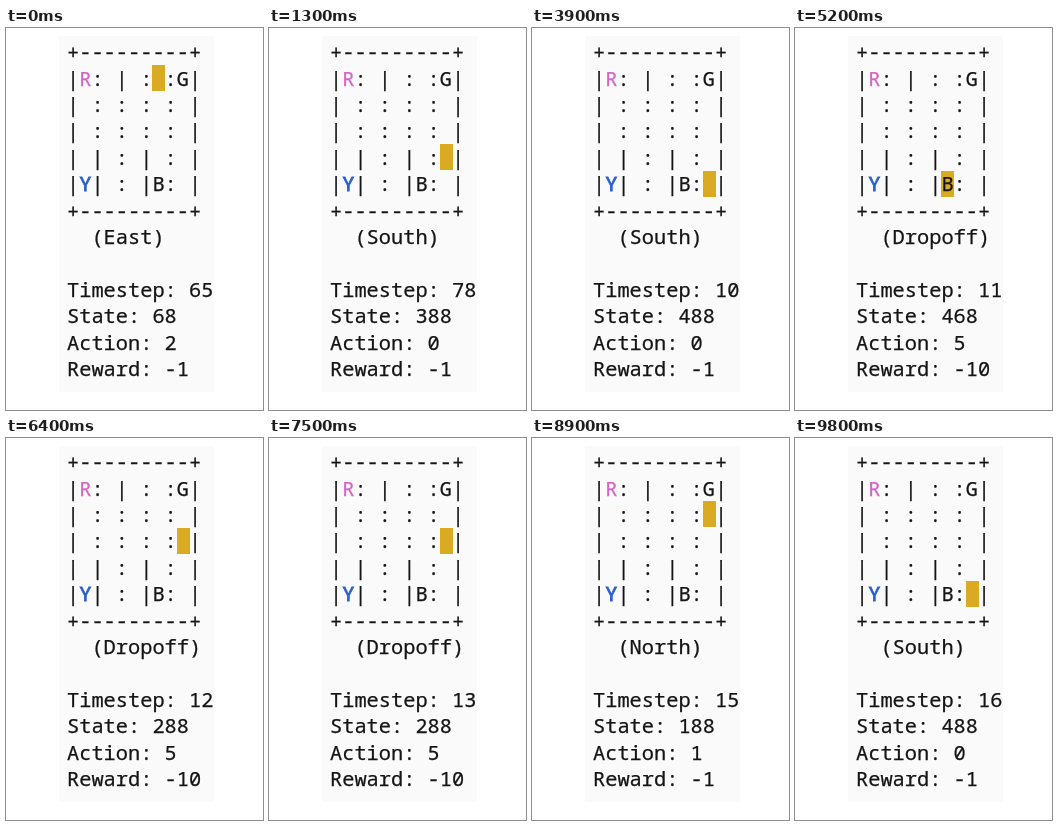
Recreate the animation shown at these times as an HTML page. Size 257x382 px, loop 9.9 s.

```html
<!DOCTYPE html>
<html lang="en">
<head>
<meta charset="utf-8">
<title>Taxi grid</title>
<style>
  html, body { margin: 0; width: 100%; height: 100%; overflow: hidden; background: #fff; }
  #panel { position: absolute; left: 53px; top: 8px; width: 155px; height: 356px;
    overflow: hidden; background: #fafafa; }
  #text { position: absolute; left: 8px; top: 2.2px; margin: 0; color: #151515;
    font: 20.33px/26.4px "Noto Sans Mono", "DejaVu Sans Mono", monospace;
    -webkit-text-stroke: 0.25px; }
  #taxi { position: absolute; width: 13px; height: 26px; background: #d9aa22; }
  .passenger { color: #2b62c9; -webkit-text-stroke: 0.9px; }
  .goal { color: #d467c6; }
</style>
</head>
<body>
<div id="panel"><div id="taxi"></div><pre id="text"></pre></div>
<script>
const MAP = [
  '+---------+',
  '|R: | : :G|',
  '| : : : : |',
  '| : : : : |',
  '| | : | : |',
  '|Y| : |B: |',
  '+---------+'
];
const ACTIONS = {
  S: ['South', 0], N: ['North', 1], E: ['East', 2],
  W: ['West', 3], P: ['Pickup', 4], D: ['Dropoff', 5]
};
const FIRST_STEP = 65, TICK = 100, LOOP = 9900;
const HOLDS = [25, 27];   // ticks on which the simulation pauses
const ROUTE =
  'EDEPNSNEDSN' + 'SSSEPSDNSE' + 'DSPEDE' + 'PSNNDSESP' + 'DSS' +
  'PEWDWPSDD' + 'SWDPWW' + 'NNDENPESDS' + 'PENDSENPED' +
  'PENDESPNDE' + 'NSSNDPSEDS' + 'NSS';

const CHAR = 12.2, LINE = 26.4;
const text = document.getElementById('text');
const taxi = document.getElementById('taxi');

function move({ row, col }, action) {
  const open = side => MAP[row + 1][2 * col + 1 + side] === ':';
  if (action === 'S') row = Math.min(4, row + 1);
  if (action === 'N') row = Math.max(0, row - 1);
  if (action === 'E' && open(1)) col++;
  if (action === 'W' && open(-1)) col--;
  return { row, col };
}

let place = { row: 0, col: 2 };
const steps = [...ROUTE].map((action, i) => {
  place = move(place, action);
  return { ...place, action, time: FIRST_STEP + i };
});

const board = MAP.join('\n')
  .replace('R', '<span class="goal">R</span>')
  .replace('Y', '<span class="passenger">Y</span>');

function show({ row, col, action, time }) {
  const [name, code] = ACTIONS[action];
  text.innerHTML = `${board}
  (${name})

Timestep: ${time}
State: ${(row * 5 + col) * 20 + 8}
Action: ${code}
Reward: ${code > 3 ? -10 : -1}`;
  taxi.style.left = 8 + (2 * col + 1) * CHAR + 'px';
  taxi.style.top = 29 + row * LINE + 'px';
}

let shown = -1;
const start = performance.now();
function frame(now) {
  const tick = Math.floor((Math.max(0, now - start) % LOOP) / TICK);
  const index = tick - HOLDS.filter(hold => hold <= tick).length;
  if (index !== shown) show(steps[shown = index]);
  requestAnimationFrame(frame);
}
frame(start);
</script>
</body>
</html>
```
